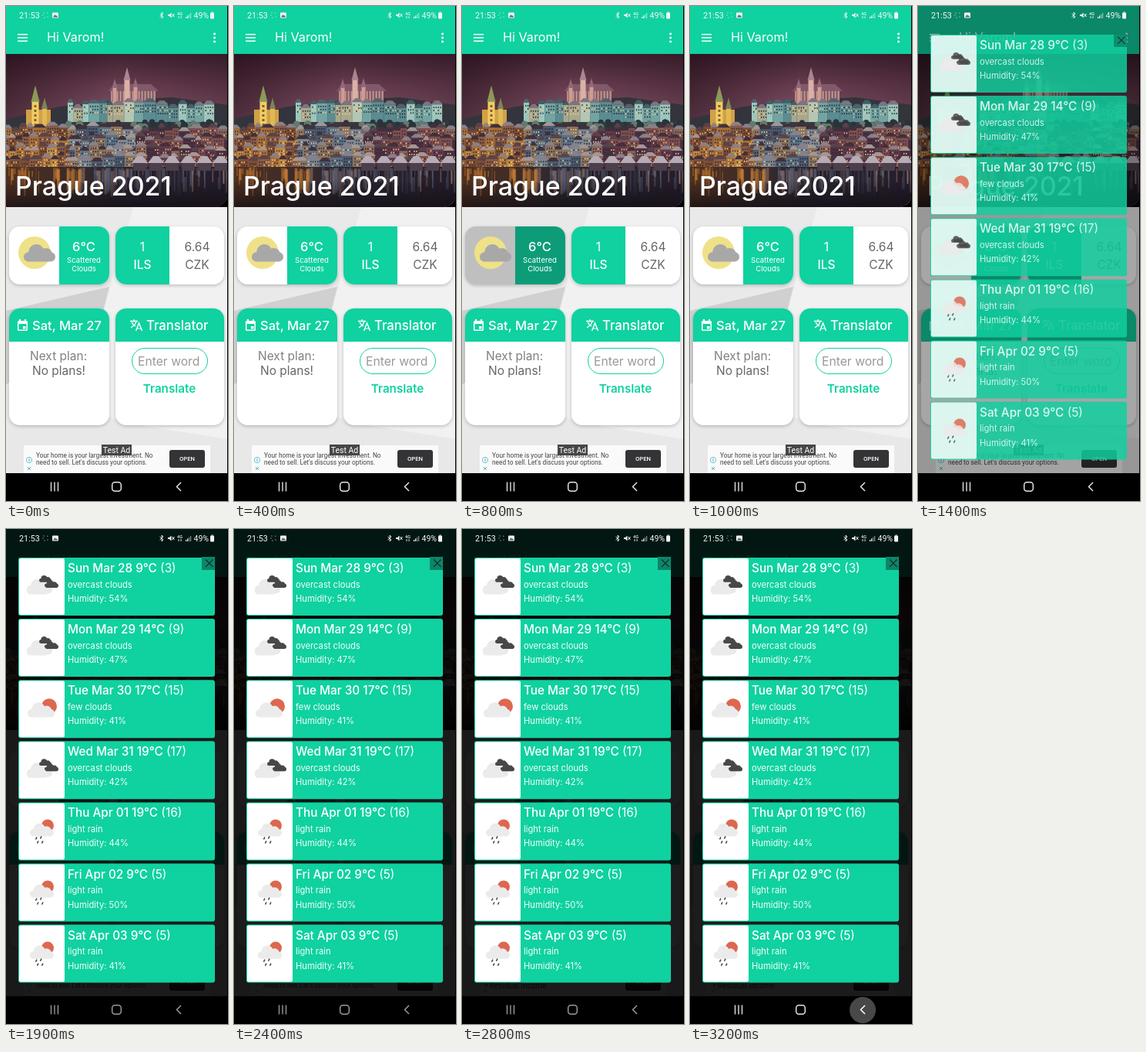
Animation, 288 px wide and 640 px high, one loop 3.3 s. Source, as an HTML page with a canvas:

```html
<!DOCTYPE html>
<html lang="en">
<head>
<meta charset="utf-8">
<title>Trip planner</title>
<style>
html, body { margin: 0; width: 100%; height: 100%; overflow: hidden; background: #000; }
canvas { display: block; width: 288px; height: 640px; }
</style>
</head>
<body>
<canvas id="stage" width="288" height="640"></canvas>
<script>
const ctx = document.getElementById('stage').getContext('2d');
const LOOP = 3300, STEP = 100;
const GREEN = '#10d1a0';
const SANS = 'Inter, sans-serif', UI = 'Roboto, sans-serif';

const clamp = v => Math.max(0, Math.min(1, v));
const ramp = (t, a, b) => clamp((t - a) / (b - a));

function rect(x, y, w, h, fill) {
  ctx.fillStyle = fill;
  ctx.fillRect(x, y, w, h);
}
function roundPath(x, y, w, h, r) {
  ctx.beginPath();
  ctx.roundRect(x, y, w, h, r);
}
function round(x, y, w, h, r, fill) {
  roundPath(x, y, w, h, r);
  ctx.fillStyle = fill;
  ctx.fill();
}
function disc(x, y, r, fill) {
  ctx.beginPath();
  ctx.arc(x, y, r, 0, Math.PI * 2);
  ctx.fillStyle = fill;
  ctx.fill();
}
function poly(points, fill) {
  ctx.beginPath();
  for (let i = 0; i < points.length; i += 2) ctx.lineTo(points[i], points[i + 1]);
  ctx.fillStyle = fill;
  ctx.fill();
}
function line(points, color, width = 1) {
  ctx.beginPath();
  for (let i = 0; i < points.length; i += 2) ctx.lineTo(points[i], points[i + 1]);
  ctx.strokeStyle = color;
  ctx.lineWidth = width;
  ctx.stroke();
}
function text(str, x, y, size, color = '#fff', weight = 400, align = 'left', family = SANS) {
  ctx.font = `${weight} ${size}px ${family}`;
  ctx.textAlign = align;
  ctx.fillStyle = color;
  ctx.fillText(str, x, y);
  return ctx.measureText(str).width;
}
function cloud(x, y, w, color) {
  const h = w * 0.55;
  round(x, y + h * 0.45, w, h * 0.55, h * 0.27, color);
  disc(x + w * 0.4, y + h * 0.45, h * 0.45, color);
  disc(x + w * 0.7, y + h * 0.58, h * 0.36, color);
}
function seeded(seed) {
  return () => (seed = (seed * 16807) % 2147483647) / 2147483647;
}
function gradient(x0, y0, x1, y1, ...colors) {
  const g = ctx.createLinearGradient(x0, y0, x1, y1);
  colors.forEach((c, i) => g.addColorStop(i / (colors.length - 1), c));
  return g;
}

function tower(x, y, w, base, color, roof) {
  rect(x - w / 2, y, w, base - y, color);
  poly([x - w / 2 - 1, y, x, y - w * 2.4, x + w / 2 + 1, y], roof);
}

const walls = {
  castle: ['#9cc5bc', '#72a4a3', '#b6c6b4', '#5b8c92', '#a9a88d'],
  amber: ['#a8703a', '#7b4c33', '#bf8a45', '#8a5a42'],
  blue: ['#5b7186', '#4a5a70', '#7c8791', '#8a7460'],
  rose: ['#63394a', '#7e4f50', '#4c3143', '#8a6558']
};

function houses(rnd, x0, x1, y, depth, colors, roofs) {
  for (let x = x0; x < x1;) {
    const w = 7 + rnd() * 10, top = y + rnd() * 8;
    rect(x, top, w, depth, colors[Math.floor(rnd() * colors.length)]);
    poly([x - 1, top, x + w * 0.3, top - 5, x + w * 0.7, top - 5, x + w + 1, top], roofs[Math.floor(rnd() * roofs.length)]);
    for (let k = 2; k < w - 1; k += 3) {
      for (let row = 3; row < 14; row += 4) {
        rect(x + k, top + row, 1.3, 1.8, rnd() > 0.65 ? '#f3cf83' : '#2b2530');
      }
    }
    x += w;
  }
}

function drawPhoto() {
  const rnd = seeded(77);
  ctx.save();
  roundPath(0, 62, 288, 198, [0, 0, 18, 0]);
  ctx.clip();
  rect(0, 62, 288, 198, gradient(0, 62, 0, 150, '#402230', '#6a3f52', '#87586c'));
  rect(0, 62, 288, 100, gradient(0, 0, 288, 0, 'rgba(25,8,16,.5)', 'rgba(25,8,16,0)', 'rgba(25,8,16,.25)'));

  // hill and cathedral
  poly([0, 146, 70, 130, 140, 122, 215, 118, 288, 128, 288, 200, 0, 200], '#34343c');
  rect(136, 107, 58, 20, '#b58b88');
  for (let x = 138; x < 194; x += 4) rect(x, 110, 1.2, 14, '#6a4655');
  poly([133, 110, 140, 101, 188, 101, 198, 110], '#805a6b');
  tower(157, 96, 7, 127, '#dbb0a5', '#ad8590');
  tower(141, 106, 5, 127, '#cf9b92', '#93697a');
  tower(168, 105, 5, 127, '#cf9b92', '#93697a');

  // castle front
  houses(rnd, 80, 262, 124, 26, walls.castle, ['#53616c', '#7d7480', '#416068']);
  rect(76, 150, 212, 12, '#333c40');
  for (let i = 0; i < 60; i++) disc(70 + rnd() * 218, 150 + rnd() * 10, 2 + rnd() * 3, rnd() > 0.6 ? '#65796d' : '#2b333a');

  // lit church
  rect(26, 134, 32, 30, '#d2a045');
  tower(38, 124, 9, 162, '#f0cd65', '#8c9a58');
  tower(50, 133, 6, 162, '#dfb956', '#7b8558');
  for (let y = 128; y < 160; y += 6) rect(36.5, y, 3, 3, '#86602e');

  // town
  const roofs = ['#42303a', '#89808a', '#58434a', '#a59694'];
  for (let y = 154; y < 195; y += 13) {
    houses(rnd, -4, 82, y, 40, walls.amber, roofs);
    houses(rnd, 82, 168, y, 40, walls.blue, roofs);
    houses(rnd, 168, 288, y, 40, walls.rose, roofs);
  }

  // river with reflections
  rect(0, 208, 288, 52, gradient(0, 0, 288, 0, '#50301f', '#2a2631', '#241c2a'));
  for (let i = 0; i < 110; i++) {
    const x = rnd() * 288;
    ctx.globalAlpha = 0.15 + rnd() * 0.5;
    const glow = x < 95 ? '#c97e34' : rnd() > 0.6 ? '#b58a72' : '#5d6378';
    rect(x, 208 + rnd() * 6, 1 + rnd() * 3, 6 + rnd() * 28, glow);
  }
  ctx.globalAlpha = 1;
  for (let x = 165; x < 288; x += 21) {
    rect(x, 201, 17, 12, '#4c3e4b');
    poly([x - 2, 203, x + 5, 194, x + 12, 194, x + 19, 203], '#b7acb5');
    rect(x + 3, 213, 3, 8, '#211d26');
  }
  rect(0, 225, 288, 35, gradient(0, 225, 0, 260, 'rgba(15,12,18,0)', 'rgba(15,12,18,.7)'));
  ctx.restore();
  text('Prague 2021', 12, 245, 34, '#fff', 500);
}

function card(x, y, w, h, paint) {
  ctx.save();
  ctx.shadowColor = 'rgba(0,0,0,.22)';
  ctx.shadowBlur = 4;
  ctx.shadowOffsetY = 1.5;
  round(x, y, w, h, 14, '#fff');
  ctx.restore();
  ctx.save();
  roundPath(x, y, w, h, 14);
  ctx.clip();
  paint();
  ctx.restore();
}

function drawHeader() {
  rect(0, 0, 288, 62, GREEN);
  for (const y of [36, 40.3, 44.6]) rect(15, y, 13, 1.5, '#fff');
  text('Hi Varom!', 53, 46, 16.2);
  for (const y of [36, 41, 46]) disc(270.5, y, 1.5, '#fff');
}

function drawBackdrop() {
  rect(0, 260, 288, 344, '#f1f1f1');
  poly([0, 260, 165, 260, 126, 395, 0, 395], '#e9e9e9');
  poly([0, 394, 134, 363, 126, 395, 0, 490], '#d0d0d0');
  poly([0, 490, 160, 540, 288, 560, 288, 604, 0, 604], '#e8e8e8');
}

function drawWeather(press) {
  card(4, 285, 130, 75, () => {
    rect(69, 285, 65, 75, GREEN);
    rect(4, 285, 130, 75, `rgba(0,0,0,${0.25 * press})`);
    disc(37, 319, 21, '#efe187');
    cloud(23, 308, 41, '#a8a8a8');
    text('6°C', 101, 317, 16.5, '#fff', 500, 'center');
    text('Scattered', 101, 332, 9.6, '#fff', 400, 'center');
    text('Clouds', 101, 343, 9.6, '#fff', 400, 'center');
  });
}

function drawCurrency() {
  card(142, 285, 141, 75, () => {
    rect(142, 285, 70, 75, GREEN);
    text('1', 177, 317, 15.5, '#fff', 400, 'center');
    text('ILS', 177, 340, 15.5, '#fff', 500, 'center');
    text('6.64', 248, 317, 15.5, '#666', 400, 'center');
    text('CZK', 248, 340, 15.5, '#666', 400, 'center');
  });
}

function drawPlan() {
  card(4, 391, 130, 151, () => {
    rect(4, 391, 130, 43, GREEN);
    round(15, 407, 13, 13, 1.5, '#fff');
    rect(16.5, 411, 10, 7.5, GREEN);
    rect(22, 414, 3.5, 3.5, '#fff');
    rect(17, 405, 2, 3, '#fff');
    rect(24, 405, 2, 3, '#fff');
    text('Sat, Mar 27', 34, 419, 16.5, '#fff', 500);
    text('Next plan:', 31, 458, 15.5, '#808080');
    text('No plans!', 34, 477, 15.5, '#666');
  });
}

function drawTranslator() {
  card(142, 391, 141, 151, () => {
    rect(142, 391, 141, 43, GREEN);
    line([161, 407.5, 171, 407.5], '#fff', 1.3);
    line([166, 405, 166, 407], '#fff', 1.3);
    line([169, 408, 167, 412, 162, 416], '#fff', 1.3);
    line([163, 409, 166, 413, 168, 414], '#fff', 1.3);
    line([168.5, 420, 172.5, 410, 176.5, 420], '#fff', 1.4);
    line([170, 417, 175, 417], '#fff', 1.2);
    text('Translator', 182, 419, 16.7, '#fff', 500);
    roundPath(163.5, 442.5, 98, 33, 16.5);
    ctx.strokeStyle = GREEN;
    ctx.lineWidth = 1;
    ctx.stroke();
    text('Enter word', 171, 465, 15.7, '#999');
    text('Translate', 212, 500, 15.2, GREEN, 600, 'center');
  });
}

function drawAd(t) {
  rect(23, 568, 242, 36, '#fafafa');
  ctx.strokeStyle = '#4fb9cc';
  ctx.lineWidth = 0.8;
  ctx.beginPath();
  ctx.arc(30, 587, 3.7, 0, 7);
  ctx.stroke();
  rect(29.5, 586, 1, 3, '#4fb9cc');
  rect(29.5, 584.5, 1, 1, '#4fb9cc');
  line([28, 596, 32, 600], '#4fb9cc');
  line([32, 596, 28, 600], '#4fb9cc');
  if (t < 2500) {
    text('Your home is your largest investment. No', 39, 584, 8.3, '#444', 400, 'left', UI);
    text("need to sell. Let's discuss your options.", 39, 593, 8.3, '#444', 400, 'left', UI);
  } else {
    text('• Residual Income', 30, 594, 10, '#444', 400, 'left', UI);
  }
  rect(124, 567, 39, 14, '#464646');
  text('Test Ad', 143.5, 578, 10.5, '#fff', 400, 'center', UI);
  round(212, 574, 46, 23, 3, '#343436');
  text('OPEN', 235, 588, 7.7, '#fff', 500, 'center', UI);
}

function drawStatus() {
  const c = '#f4f4f4';
  text('21:53', 17, 16, 10.8, c, 400, 'left', UI);
  ctx.strokeStyle = 'rgba(255,255,255,.55)';
  ctx.lineWidth = 0.8;
  ctx.setLineDash([2, 3]);
  ctx.strokeRect(48, 9, 6, 6);
  ctx.setLineDash([]);
  round(60, 8.5, 8, 7, 1, c);
  poly([61, 14.5, 63.5, 11, 65, 13, 66, 12, 67.2, 14.5], '#536a64');
  line([199.5, 10, 204, 14, 202, 16, 202, 8, 204, 10, 199.5, 14], c, 0.9);
  poly([210, 11, 212, 11, 214.5, 8.5, 214.5, 15.5, 212, 13, 210, 13], c);
  line([215.5, 10, 218.5, 14], c);
  line([218.5, 10, 215.5, 14], c);
  text('4G', 222, 12, 5.5, c, 500, 'left', UI);
  line([224, 13, 224, 16], c, 0.9);
  line([227, 16, 227, 13], c, 0.9);
  for (let i = 0; i < 4; i++) rect(233 + i * 2, 14 - i * 1.7, 1.2, 2 + i * 1.7, i < 2 ? c : 'rgba(255,255,255,.5)');
  text('49%', 243.5, 16, 10.5, c, 400, 'left', UI);
  round(265, 8.5, 5, 8, 1, c);
  rect(266.5, 7.5, 2, 1, c);
}

function drawNav(press, dim) {
  const c = dim ? '#989898' : '#e2e2e2';
  rect(0, 604, 288, 36, '#000');
  if (press) disc(224, 622, 12 + 5 * press, `rgba(72,72,72,${press})`);
  for (const x of [58.5, 63, 67.5]) rect(x - 0.7, 615.5, 1.4, 12, c);
  roundPath(137.7, 615.7, 11.6, 11.6, 3.5);
  ctx.strokeStyle = c;
  ctx.lineWidth = 1.5;
  ctx.stroke();
  line([227, 616, 221.5, 621.5, 227, 627], press ? '#fff' : c, 1.5);
}

const overcast = ['overcast clouds', y => {
  cloud(27, y + 28, 33, '#e9e9e9');
  cloud(43, y + 23, 16, '#484848');
  cloud(50, y + 29, 18, '#484848');
  cloud(27, y + 32, 28, '#ebebeb');
}];
const few = ['few clouds', y => {
  disc(56, y + 34, 10, '#dd674f');
  cloud(28, y + 29, 35, '#ebebeb');
}];
const rain = ['light rain', y => {
  disc(54, y + 30, 8, '#dd674f');
  cloud(31, y + 27, 31, '#ebebeb');
  for (const [x, dy] of [[39, 45], [45, 44], [41, 50], [47, 50]]) line([x + 1, y + dy, x - 0.5, y + dy + 3], '#444', 1.5);
}];
const forecast = [
  ['Sun Mar 28 9°C', 3, overcast, 54],
  ['Mon Mar 29 14°C', 9, overcast, 47],
  ['Tue Mar 30 17°C', 15, few, 41],
  ['Wed Mar 31 19°C', 17, overcast, 42],
  ['Thu Apr 01 19°C', 16, rain, 44],
  ['Fri Apr 02 9°C', 5, rain, 50],
  ['Sat Apr 03 9°C', 5, rain, 41]
];

function drawDialog(alpha) {
  ctx.globalAlpha = alpha;
  forecast.forEach(([day, feels, [sky, icon], humidity], i) => {
    const y = 37 + i * 79.1;
    round(16, y, 255, 75, 3, GREEN);
    round(17, y + 1, 59, 73, 2, '#fff');
    icon(y);
    const w = text(day, 80, y + 19, 15.3, '#fff', 500);
    text(` (${feels})`, 80 + w, y + 19, 15.3);
    text(sky, 80, y + 38.5, 11.2, '#f2fffb');
    text(`Humidity: ${humidity}%`, 80, y + 57, 11.2, '#f2fffb');
  });
  rect(254, 36, 17, 17, '#0b8669');
  line([259, 39.5, 268.5, 49], '#12332c', 1.3);
  line([268.5, 39.5, 259, 49], '#12332c', 1.3);
  ctx.globalAlpha = 1;
}

function draw(t) {
  const press = ramp(t, 600, 800) * (1 - ramp(t, 850, 1000));
  const dim = 0.89 * ramp(t, 1270, 1600);
  const shown = ramp(t, 1250, 1430);
  const back = ramp(t, 2900, 3100);

  drawBackdrop();
  drawHeader();
  drawPhoto();
  drawWeather(press);
  drawCurrency();
  drawPlan();
  drawTranslator();
  drawAd(t);
  if (dim) rect(0, 0, 288, 604, `rgba(0,0,0,${dim})`);
  if (shown) drawDialog(shown);
  drawStatus();
  drawNav(back, t >= 1600 && !back);
  rect(287, 0, 1, 640, '#000');
}

const start = performance.now();
function tick() {
  const t = (performance.now() - start) % LOOP;
  draw(Math.floor(t / STEP) * STEP);
  requestAnimationFrame(tick);
}
tick();
</script>
</body>
</html>
```
